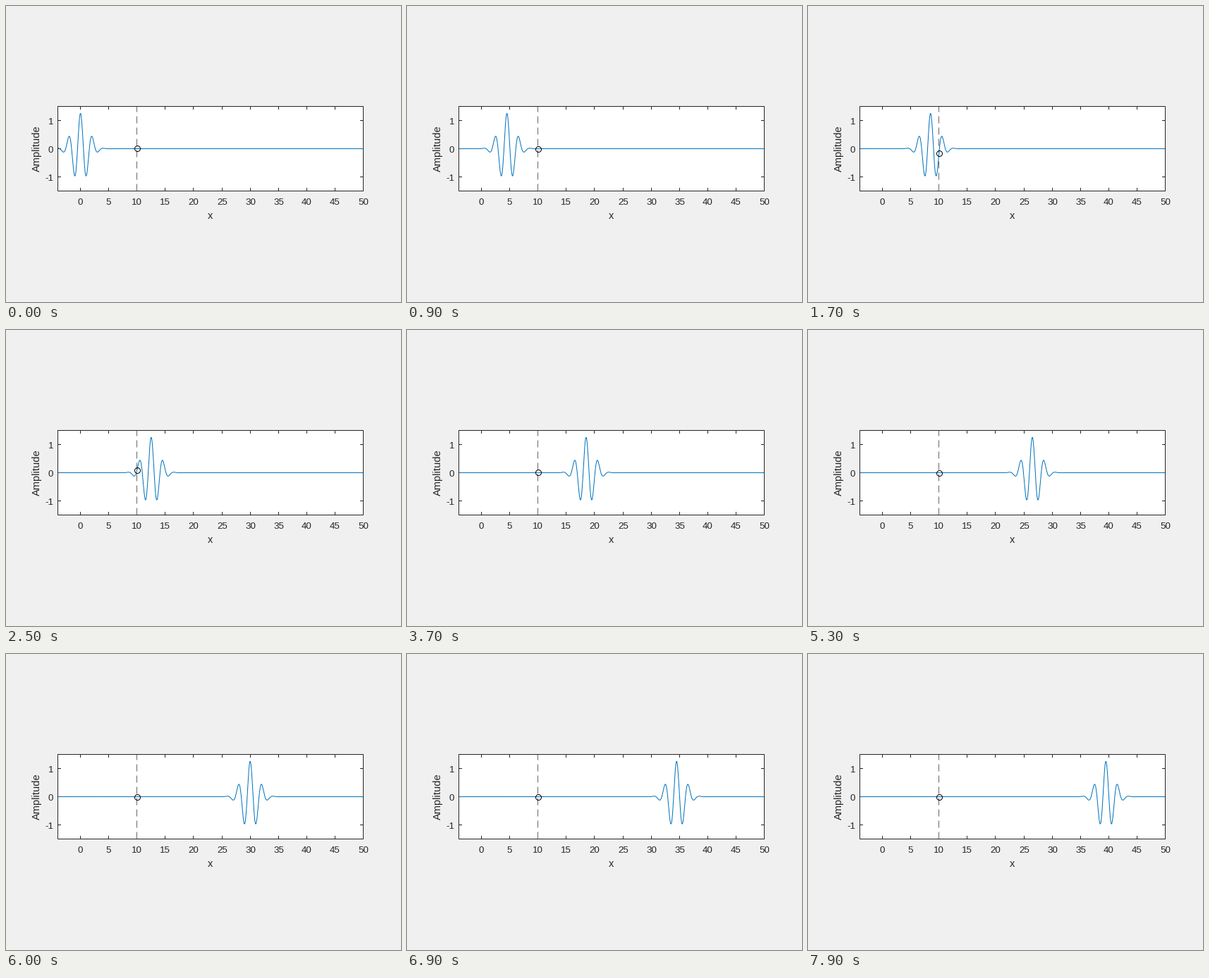
Write a matplotlib script that moves like this. It is 560 px wide and 420 px high and loops after 8000 ms.

```python
import numpy as np
import matplotlib.pyplot as plt
from matplotlib.animation import FuncAnimation
from matplotlib.patches import Rectangle

W, H, DPI = 560, 420, 80
PX = 72 / DPI                      # one pixel in points
LEFT, RIGHT, TOP, BOTTOM = 73.5, 506.5, 142.5, 262.5
X0, X1, Y0, Y1 = -4, 50, -1.5, 1.5
FRAMES, INTERVAL = 80, 100
SPEED = 0.5                        # x units per frame
PROBE = 10
INK = (0.15, 0.15, 0.15)

plt.rcParams["font.family"] = "Liberation Sans"


def to_px(x):
    return LEFT + (x - X0) / (X1 - X0) * (RIGHT - LEFT)


def to_py(y):
    return BOTTOM - (y - Y0) / (Y1 - Y0) * (BOTTOM - TOP)


def crisp(v):
    return np.floor(v) + 0.5


def packet(x, center):
    d = x - center
    return np.sqrt(np.pi / 2) * np.exp(-d**2 / 4) * np.cos(3 * d)


fig = plt.figure(figsize=(W / DPI, H / DPI), dpi=DPI, facecolor="#f0f0f0")
ax = fig.add_axes([0, 0, 1, 1])
ax.set_xlim(0, W)
ax.set_ylim(H, 0)
ax.axis("off")


def line(xs, ys, color=INK, **kw):
    kw = {"lw": PX, "snap": False, "solid_capstyle": "butt", **kw}
    return ax.plot(xs, ys, color=color, **kw)[0]


def label(x, y, s, size=13.33, ha="center", rotation=0):
    ax.text(x, y, s, fontsize=size * PX, color=INK, ha=ha, va="baseline",
            rotation=rotation, rotation_mode="anchor")


ax.add_patch(Rectangle((LEFT, TOP), RIGHT - LEFT, BOTTOM - TOP,
                       fc="white", ec="none", zorder=0))

# Frame, ticks and labels
line([LEFT, RIGHT, RIGHT, LEFT, LEFT], [TOP, TOP, BOTTOM, BOTTOM, TOP],
     solid_joinstyle="miter", zorder=5)
TICK = 4.5
for v in range(0, 51, 5):
    x = crisp(to_px(v))
    line([x, x], [TOP, TOP + TICK])
    line([x, x], [BOTTOM, BOTTOM - TICK])
    label(x, 282.3, str(v))
for v in (-1, 0, 1):
    y = crisp(to_py(v))
    line([LEFT, LEFT + TICK], [y, y])
    line([RIGHT, RIGHT - TICK], [y, y])
    label(67.3, y + 5.2, str(v), ha="right")
label(290, 302, "x", 14.67)
label(48, 202.5, "Amplitude", 14.67, rotation=90)

# Probe line, wave and marker
probe_x = crisp(to_px(PROBE))
line([probe_x, probe_x], [BOTTOM, TOP], "#676767", ls=(0, (10, 6)),
     dash_capstyle="butt", zorder=3)
xs = np.linspace(X0, X1, 1081)
wave = line(to_px(xs), to_py(0 * xs), "#0072BD", zorder=4,
            solid_joinstyle="round")
dot = line([probe_x], [to_py(0)], "black", marker="o", ms=8 * PX, mfc="none",
           mew=PX, ls="none", zorder=6)


def update(i):
    center = SPEED * i
    wave.set_ydata(to_py(packet(xs, center)))
    dot.set_ydata([to_py(packet(PROBE, center))])
    return wave, dot


anim = FuncAnimation(fig, update, frames=FRAMES, interval=INTERVAL,
                     repeat=True, repeat_delay=0, blit=False)
plt.show()
```
